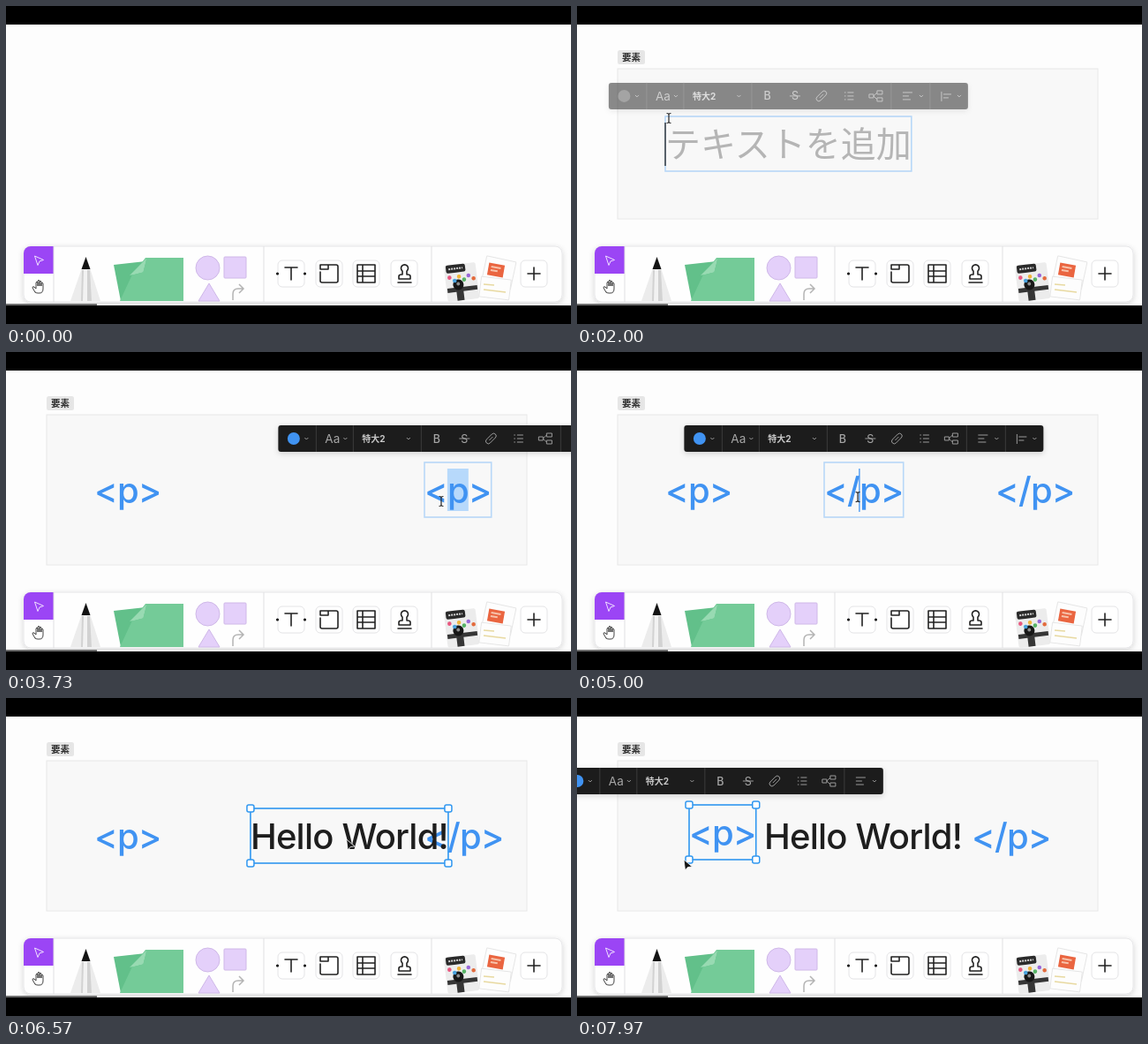
An HTML page for the animation above (8 s loop, 640x360 px).

```html
<!DOCTYPE html>
<html lang="ja">
<head>
<meta charset="utf-8">
<title>Whiteboard</title>
<style>
  html, body { margin: 0; width: 100%; height: 100%; overflow: hidden; background: #000; }
  svg { display: block; width: 640px; height: 360px; font-family: Inter, "Noto Sans CJK JP", sans-serif; }
  .line { fill: none; stroke: #222; stroke-width: 1.6; stroke-linecap: round; stroke-linejoin: round; }
  .icon { fill: none; stroke: #999; }
  .rule { fill: none; stroke: #3c3c3c; }
  .item text { font-size: 40px; font-weight: 500; letter-spacing: -.02em; white-space: pre; }
  .item .hint { font-weight: 400; letter-spacing: 0; }
</style>
</head>
<body>
<svg viewBox="0 0 640 360">
  <defs>
    <filter id="shadow" x="-10%" y="-40%" width="120%" height="200%">
      <feDropShadow dx="0" dy="2" stdDeviation="3" flood-color="#000" flood-opacity=".16"/>
    </filter>
  </defs>
  <rect width="640" height="360"/>
  <rect y="21" width="640" height="318" fill="#fdfdfd"/>

  <g id="section">
    <rect id="area" x="46" y="71" fill="#f8f8f8" stroke="#e8e8e8"/>
    <g id="label">
      <rect x="46" y="50" width="31" height="16" rx="2.5" fill="#e6e6e6"/>
      <text x="51" y="62" font-size="10.5" font-weight="700" fill="#2a2a2a">要素</text>
    </g>
  </g>
  <g id="items"></g>

  <g id="bar">
    <rect id="barBack" height="30" rx="3" fill="#1e1e1e" filter="url(#shadow)"/>
    <path class="rule" d="M43 0v30M85 0v30M162 0v30M320 0v30"/>
    <circle id="chip" cx="17.5" cy="15" r="7"/>
    <g fill="#a6a6a6">
      <text x="53" y="20" font-size="13.5">Aa</text>
      <text x="95" y="19" font-size="10" font-weight="700" fill="#c8c8c8">特大2</text>
      <text x="175.5" y="19.5" font-size="12.5" font-weight="500">B</text>
      <text x="207" y="19.5" font-size="12.5">S</text>
    </g>
    <path class="icon" d="M30 14l2 2 2-2M74 14l2 2 2-2M145.500 14l2 2 2-2M205 15h12
      M239 13l3-3a2.600 2.600 0 0 1 4 4l-3 3M243 17l-3 3a2.600 2.600 0 0 1-4-4l3-3M239 17l4-4
      M267 11h1.500M270.500 11h7M267 15h1.500M270.500 15h7M267 19h1.500M270.500 19h7
      M295 13h5v4h-5zM304 9h6v4h-6zM304 17h6v4h-6zM300 15l4-4M300 15l4 4
      M333 11h11M333 15h7M333 19h9M352 14l2 2 2-2"/>
    <g id="more">
      <path class="rule" d="M364 0v30"/>
      <path class="icon" d="M377 10v11M379 13h9M379 17h6M395 14l2 2 2-2"/>
    </g>
  </g>

  <g id="dock">
    <rect x="20" y="272" width="610" height="63" rx="8" fill="#fefefe" stroke="#e6e6e8" filter="url(#shadow)"/>
    <path d="M54 272H28a8 8 0 0 0-8 8v23h34z" fill="#9b45f5"/>
    <path d="M32.500 283l10 4.500-4.500 1.500-2 4.500z" fill="none" stroke="#f0e0ff"/>
    <path class="line" style="stroke:#444;stroke-width:1" d="M33 324l-3-5q0-2 2-1l2 2v-7q1-2 2 0v4v-6q1-1.500 2 0v6v-5q1-1.500 2 0v5v-3q1.500-1.500 2 0v6q0 5-4 5h-2q-2 0-3-1z"/>
    <path d="M54 272v63M292 272v63M482 272v63" stroke="#e0e0e2"/>

    <path d="M85.500 298h10L107 334H73z" fill="#ececec"/>
    <path d="M86 299h9l2 35H85z" fill="#d2d2d2"/>
    <path d="M88 299h4v35h-5z" fill="#f2f2f2"/>
    <path d="M90.500 284l5 14h-10z" fill="#141414"/>

    <path d="M122 293l72-8 6 49h-70z" fill="#62c08a"/>
    <path d="M158 285h43v49h-72l14-30z" fill="#74cb98"/>
    <path d="M158 289l-3 12-12 3z" fill="#b4e5c8"/>
    <path d="M140 305l19-19-4 15z" fill="#98dab2"/>

    <g fill="#e4d0fa" stroke="#cfb8e8">
      <circle cx="228.500" cy="296.500" r="13.500"/>
      <rect x="247" y="284" width="25" height="24" rx="1"/>
      <path d="M230 314l12 20h-24z"/>
    </g>
    <path d="M257 333v-7q0-6 6-6h5m-4-5l5 5-5 5" fill="none" stroke="#b4b4b4" stroke-width="1.500"/>

    <g id="buttons" fill="#fff" stroke="#e4e4e6"></g>
    <path class="line" d="M316 296h14M323 296v14
      M361 293h13q2 0 2 2v16q0 2-2 2h-16q-2 0-2-2v-10M356 293h9v5h-9z
      M398 293h20v20h-20zM404 293v20M398 300h20M398 306h20
      M444 313h15M445 309v-3q0-2 3-2h1v-4a4 4 0 1 1 5 0v4h1q3 0 3 2v3z
      M598 296v14M591 303h14"/>
    <circle cx="307.500" cy="303" r="1.500"/><circle cx="338.500" cy="303" r="1.500"/>

    <g transform="rotate(-7 516 312)">
      <rect x="498" y="292" width="36" height="41" rx="2" fill="#ececec"/>
      <rect x="500" y="292" width="22" height="9" rx="2" fill="#2a2a2a"/>
      <path d="M503 296.500h16" stroke="#d6d6d6" stroke-width="2" stroke-dasharray="2 1"/>
      <path d="M499 318h34v5h-34zM509 322h8v11h-8z" fill="#363636"/>
      <circle cx="512" cy="315" r="6" fill="#171717"/>
      <circle cx="512" cy="314" r="2" fill="#8d8d8d"/>
      <g id="dots"></g>
    </g>
    <g fill="#fdfdfd" stroke="#e6e6e6">
      <rect x="541" y="286" width="34" height="32" rx="1" transform="rotate(12 558 302)"/>
      <rect x="537" y="308" width="34" height="23" rx="1" transform="rotate(7 554 320)"/>
    </g>
    <g transform="rotate(10 555 299)">
      <rect x="546" y="292" width="18" height="14" fill="#ea6540"/>
      <path d="M549 296h11M549 300h8" stroke="#f7c2aa" stroke-width="2"/>
    </g>
    <path d="M541 315l12 1M541 321l25 3" stroke="#e8d9a0" stroke-width="1.500"/>
  </g>
  <rect y="337" width="103" height="2" fill="#707070"/>

  <path id="arrow" d="M0 0l1.500 12 3-3.500 5-.5z" fill="#141414" stroke="#fff" stroke-width=".8"/>
  <path id="beam" class="line" style="stroke-width:1.200" d="M-2-5.500q2 0 2 1.500v8q0 1.500-2 1.500M2-5.500q-2 0-2 1.500M2 5.500q-2 0-2-1.500"/>
</svg>
<script>
const LOOP = 8000, BLUE = '#4093f2', INK = '#1e1e1e', GREY = '#b5b5b5', SELECT = '#2f97f0';
const NS = 'http://www.w3.org/2000/svg';
const $ = id => document.getElementById(id);
const set = (el, attrs) => { for (const k in attrs) el.setAttribute(k, attrs[k]); return el; };
const add = (parent, tag, attrs = {}) => set(parent.appendChild(document.createElementNS(NS, tag)), attrs);
const show = (el, on) => el.style.display = on ? '' : 'none';
const ease = v => v * v * (3 - 2 * v);
const within = (t, spans) => spans.find(([a, b]) => t >= a && t < b);

// Latest value whose time has passed.
const step = (t, keys) => keys.reduce((v, k) => t >= k[0] ? k[1] : v, null);
// Eased position between timed points [time, x, y].
function move(t, keys) {
  const i = keys.findIndex(k => k[0] > t);
  if (i === 0) return keys[0].slice(1);
  if (i < 0) return keys[keys.length - 1].slice(1);
  const [a, b] = [keys[i - 1], keys[i]];
  const p = ease((t - a[0]) / (b[0] - a[0]));
  return [a[1] + (b[1] - a[1]) * p, a[2] + (b[2] - a[2]) * p];
}
const typing = (text, start, gap) => [...text].map((c, i) => [start + i * gap, text.slice(0, i + 1)]);

const items = [
  { path: [[0, 100, 125], [7670, 100, 125], [7870, 127, 121]],
    text: [[1930, 'テキストを追加'], ...typing('<p>', 2200, 130)],
    color: [[0, GREY], [2200, INK], [2640, BLUE]],
    caret: [[0, 0], [2200, 1], [2330, 2], [2460, 3]],
    edit: [[1930, 2730]], select: [[2730, 2770], [7640, LOOP]], bars: [[1950, 2770], [7870, LOOP]] },
  { path: [[2770, 100, 125], [3200, 474, 125], [7300, 474, 125], [7540, 447, 125]],
    text: [[2770, '<p>'], [4030, '</p>']],
    color: [[0, BLUE]],
    caret: [[0, 1], [4030, 2]], mark: [3500, 3900],
    edit: [[3370, 4300]], select: [[2770, 3370], [4300, 4470], [7270, 7620]], bars: [[3230, 4470]] },
  { path: [[4470, 474, 125], [4780, 280, 125], [6530, 280, 125], [6850, 212, 125]],
    text: [[4470, '</p>'], ...typing('Hello World', 5270, 50), [5960, 'Hello World!']],
    color: [[0, BLUE], [6330, INK]],
    caret: [[0, 2], [5270, 99]],
    edit: [[4870, 6420]], select: [[4470, 4870], [6420, 7070]], bars: [[4800, 6530], [6830, 7070]] },
];

const pointer = [
  [70, 380, 345], [180, 366, 303], [300, 46, 71], [530, 590, 241], [1100, 590, 241],
  [1420, 323, 303], [1850, 104, 127], [2300, 104, 127], [2600, 54, 98], [2770, 140, 160],
  [3200, 514, 160], [3400, 520, 166], [3530, 493, 169], [4200, 493, 169], [4370, 520, 160], [4470, 520, 160],
  [4780, 326, 160], [4980, 318, 164], [5300, 321, 167], [5960, 321, 167], [6280, 202, 98],
  [6520, 390, 160], [6850, 322, 160], [7070, 322, 160], [7210, 532, 157], [7300, 532, 157],
  [7540, 505, 157], [7670, 94, 187], [7870, 121, 183]];
const pointerKind = [[70, 'arrow'], [1480, 'beam'], [2350, 'arrow'], [3330, 'beam'], [4280, 'arrow'], [4850, 'beam'], [6080, 'arrow']];

for (const x of [308, 351, 393, 436, 583]) add($('buttons'), 'rect', { x, y: 288, width: 30, height: 30, rx: 5 });
['#e9577f', '#4ba3dd', '#f0b53a', '#58b467', '#9a67d8', '#e36b3d'].forEach((fill, i) =>
  add($('dots'), 'circle', { cx: 503 + i * 5.4, cy: 306 + (i % 2) * 4, r: 2.3, fill }));

for (const item of items) {
  const g = item.g = add($('items'), 'g', { class: 'item' });
  item.box = add(g, 'rect', { height: 62, fill: 'none' });
  item.markBox = add(g, 'rect', { y: 7, height: 48, fill: '#b7d9fb' });
  item.label = add(g, 'text', { y: 46 });
  item.caretLine = add(g, 'path', { 'stroke-width': 1.3 });
  item.grips = [0, 1, 2, 3].map(() =>
    add(g, 'rect', { width: 8, height: 8, rx: 2, fill: '#fff', stroke: SELECT, 'stroke-width': 1.5 }));
}

function drawItem(item, t) {
  const text = step(t, item.text);
  show(item.g, text);
  if (!text) return;
  const [x, y] = move(t, item.path), color = step(t, item.color);
  set(item.g, { transform: `translate(${x} ${y})` });
  if (item.label.textContent !== text) item.label.textContent = text;
  set(item.label, { fill: color, class: color === GREY ? 'hint' : '' });
  const width = item.label.getComputedTextLength();
  const upTo = n => n >= text.length ? width : n ? item.label.getSubStringLength(0, n) : 0;
  const editing = within(t, item.edit), selected = within(t, item.select);
  const marked = item.mark && within(t, [item.mark]);

  show(item.box, editing || selected);
  set(item.box, { width, stroke: editing ? '#b8d8f8' : SELECT, 'stroke-width': 1.6 });
  item.grips.forEach((grip, i) => {
    show(grip, selected);
    set(grip, { x: (i % 2) * width - 4, y: (i >> 1) * 62 - 4 });
  });
  show(item.markBox, marked);
  if (marked) set(item.markBox, { x: upTo(1), width: upTo(2) - upTo(1) });
  show(item.caretLine, editing && !marked);
  set(item.caretLine, { d: `M${upTo(step(t, item.caret))} 7v49`, stroke: color === BLUE ? BLUE : INK });

  const span = within(t, item.bars);
  if (span) drawBar(x + width / 2, y - 42, Math.min(1, (t - span[0]) / 100), !selected, color);
}

function drawBar(center, top, fade, full, color) {
  const width = full ? 407 : 364;
  show($('bar'), true);
  show($('more'), full);
  set($('barBack'), { width });
  set($('chip'), { fill: color === BLUE ? BLUE : '#555' });
  set($('bar'), { transform: `translate(${center - width / 2} ${top + 8 * (1 - fade)})`, opacity: fade });
}

function draw(t) {
  const [px, py] = move(t, pointer), kind = step(t, pointerKind);
  const [right, bottom] = t < 530 ? [px, py] : [590, 241];
  show($('section'), t > 300);
  show($('label'), t >= 620);
  set($('area'), { width: Math.max(0, right - 46), height: Math.max(0, bottom - 71) });
  show($('bar'), false);
  items.forEach(item => drawItem(item, t));
  for (const id of ['arrow', 'beam']) {
    show($(id), id === kind);
    set($(id), { transform: `translate(${px} ${py})` });
  }
}

(function frame() {
  draw(performance.now() % LOOP);
  requestAnimationFrame(frame);
})();
</script>
</body>
</html>
```
